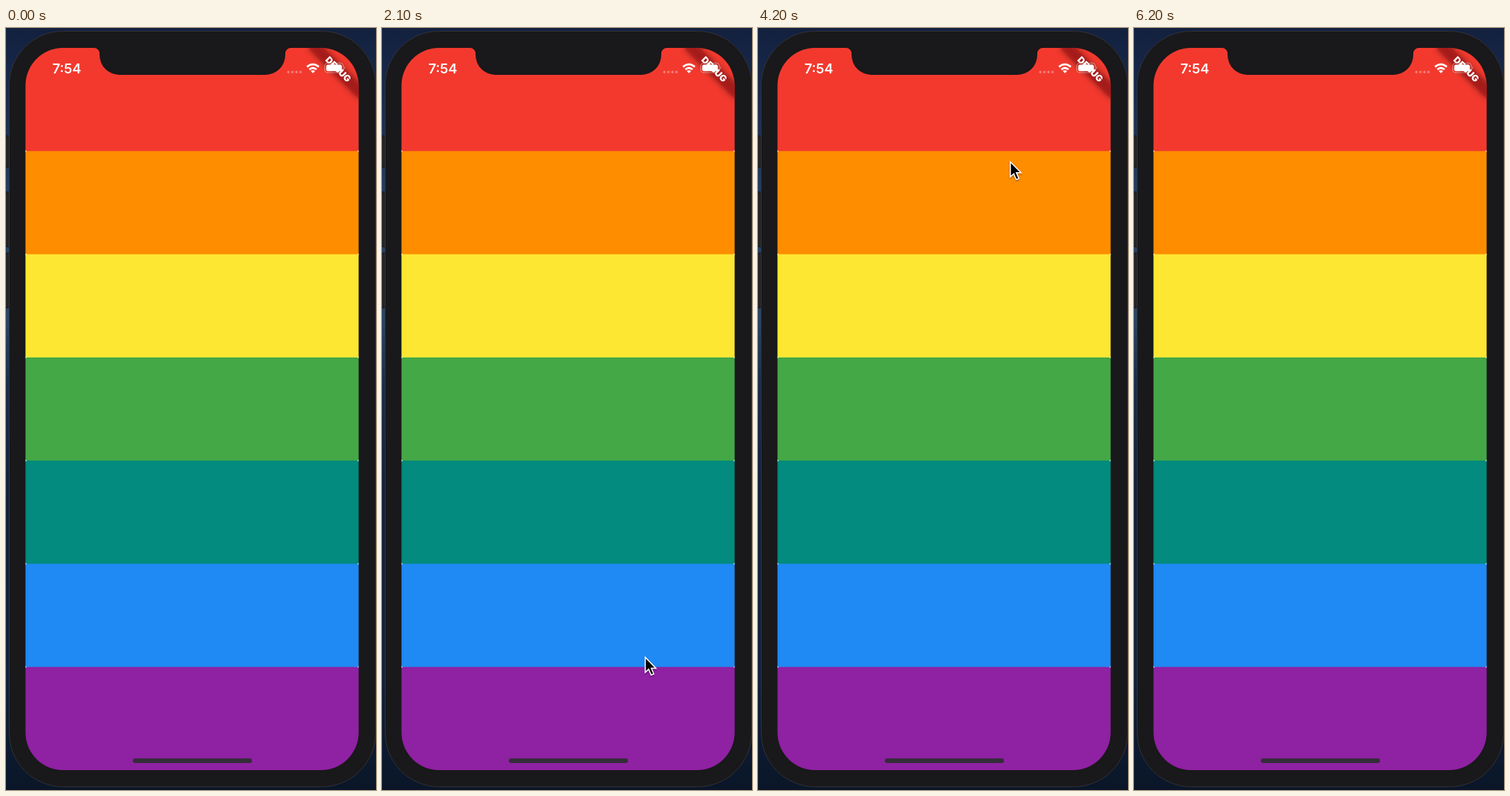
These frames come from a looping animation (522x1073 px, 6.8 s). An HTML page:

```html
<!DOCTYPE html>
<html lang="en">
<head>
<meta charset="utf-8">
<title>Color bands</title>
<style>
  html, body { margin: 0; width: 100%; height: 100%; overflow: hidden; background: #0d1830; }
  svg { display: block; width: 100vw; height: 100vh; }
  text { font-family: Inter, "Open Sans", sans-serif; fill: #fff; }
</style>
</head>
<body>
<svg viewBox="0 0 522 1073" preserveAspectRatio="none">
  <defs>
    <linearGradient id="wall" x1="0" y1="0" x2="0" y2="1">
      <stop offset="0" stop-color="#13213f"/>
      <stop offset=".1" stop-color="#192b4d"/>
      <stop offset=".22" stop-color="#243d62"/>
      <stop offset=".38" stop-color="#2a4463"/>
      <stop offset=".47" stop-color="#192c4b"/>
      <stop offset=".62" stop-color="#121f3a"/>
      <stop offset=".85" stop-color="#11203c"/>
      <stop offset="1" stop-color="#0a1628"/>
    </linearGradient>
    <clipPath id="screen"><rect x="27.5" y="28" width="470" height="1017" rx="53"/></clipPath>
    <filter id="blur" x="-50%" y="-150%" width="200%" height="400%"><feGaussianBlur stdDeviation="4"/></filter>
    <filter id="drop" x="-50%" y="-50%" width="200%" height="200%">
      <feDropShadow dx="0" dy="1.5" stdDeviation="1.3" flood-opacity=".4"/>
    </filter>
  </defs>

  <rect width="522" height="1073" fill="url(#wall)"/>
  <g fill="#242326" stroke="#111" stroke-width="1">
    <rect x="-4" y="152" width="12" height="44"/>
    <rect x="-4" y="231" width="12" height="77"/>
    <rect x="-4" y="317" width="12" height="77"/>
    <rect x="516" y="231" width="12" height="127"/>
  </g>
  <rect x="4.5" y="4.5" width="517" height="1064" rx="76" fill="#19181a" stroke="#333336"/>

  <g clip-path="url(#screen)">
    <g id="bands"></g>
    <g transform="translate(497.5 28) rotate(45)">
      <rect x="-50.1" y="35.1" width="100.3" height="15" fill="#000" opacity=".5" filter="url(#blur)"/>
      <rect x="-50.1" y="35.1" width="100.3" height="15" fill="#b71c1c" opacity=".63"/>
      <text x="1" y="46.2" font-size="12.8" font-weight="900" text-anchor="middle">DEBUG</text>
    </g>
    <path d="M124 27V28A8 8 0 0 1 132 36V38A28 28 0 0 0 160 66H366A28 28 0 0 0 394 38V36A8 8 0 0 1 402 28V27Z" fill="#19181a"/>
    <rect x="179" y="1028.5" width="168" height="6.5" rx="3.2" fill="#332d37"/>
  </g>

  <text x="65.5" y="64" font-size="19" font-weight="600">7:54</text>
  <g fill="#fff" opacity=".36">
    <circle cx="398.4" cy="62" r="1.8"/><circle cx="404.1" cy="62" r="1.8"/>
    <circle cx="409.8" cy="62" r="1.8"/><circle cx="415.5" cy="62" r="1.8"/>
  </g>
  <g fill="none" stroke="#fff" stroke-width="2.8">
    <path d="M424.7 54.8Q433 47.4 441.3 54.8"/>
    <path d="M428 58.4Q433 54 438 58.4"/>
  </g>
  <path d="M430 60.8Q433 58.4 436 60.8L433 63.8Z" fill="#fff"/>
  <rect x="449.8" y="49.4" width="26" height="13.4" rx="4" fill="none" stroke="#fff" stroke-opacity=".4" stroke-width="1.2"/>
  <rect x="451.8" y="51.4" width="22" height="9.4" rx="2.5" fill="#fff"/>
  <path d="M477.2 53.8Q479.6 56.1 477.2 58.4Z" fill="#fff" opacity=".45"/>

  <g id="cursor" filter="url(#drop)">
    <path d="M0 .5V21.6L4.8 17.2 8.3 25.4 12 23.9 8.5 15.8H15Z" fill="#000" stroke="#fff" stroke-width="1.5"/>
  </g>
</svg>

<script>
const LOOP = 6800, STEP = 100;
const TOP = 28, LEFT = 27.5, WIDTH = 470, BAND = 145.29;
const POINT = 1.2533; // stage pixels per device point
const COLORS = ["#f3392e", "#fe8d00", "#fde732", "#44a846", "#028b7e", "#1f8af3", "#8f21a3"];

const TAPS = [
  { band: 6, x: 370, y: 935, down: 1700, up: 1900 },
  { band: 4, x: 379, y: 617, down: 2600, up: 2850 },
  { band: 2, x: 337, y: 435, down: 3650, up: 3850 },
  { band: 0, x: 365, y: 134, down: 4715, up: 4915 }
];

// Pointer path: time, x, y
const PATH = [
  [700, 524, 640], [1400, 362, 703], [1700, 370, 935], [1950, 370, 935],
  [2550, 379, 619], [2900, 379, 619], [3500, 337, 432], [3850, 337, 432],
  [4200, 356, 188], [4600, 365, 134], [4800, 365, 134], [5000, 353, 275],
  [5700, 350, 470], [6200, 350, 470]
];

const clamp = v => Math.max(0, Math.min(1, v));
const bandTop = i => TOP + i * BAND;

function add(parent, tag, attrs) {
  const el = document.createElementNS("http://www.w3.org/2000/svg", tag);
  for (const key in attrs) el.setAttribute(key, attrs[key]);
  return parent.appendChild(el);
}

const defs = document.querySelector("defs");
const bandLayer = document.getElementById("bands");
const cursor = document.getElementById("cursor");

// Each fill runs slightly under the next one so no seam shows.
COLORS.forEach((fill, i) =>
  add(bandLayer, "rect", { x: LEFT - 1, y: bandTop(i), width: WIDTH + 2, height: BAND + 1, fill }));

// Rounded band corners leave small light notches at the screen edges.
for (let i = 1; i < COLORS.length; i++) {
  for (const [x, side] of [[LEFT, 1], [LEFT + WIDTH, -1]]) {
    const y = bandTop(i);
    add(bandLayer, "path", { d: `M${x} ${y - 1.6}L${x + side * 1.6} ${y}L${x} ${y + 1.6}Z`, fill: "#fff" });
  }
}

for (const tap of TAPS) {
  const y = bandTop(tap.band);
  const box = { x: LEFT, y, width: WIDTH, height: BAND };
  const clip = add(defs, "clipPath", { id: "band" + tap.band });
  add(clip, "rect", box);
  const group = add(bandLayer, "g", { "clip-path": `url(#band${tap.band})` });
  tap.shade = add(group, "rect", box);
  tap.splash = add(group, "circle", { cx: tap.x, cy: tap.y });
  const dx = Math.max(tap.x - LEFT, LEFT + WIDTH - tap.x);
  const dy = Math.max(tap.y - y, y + BAND - tap.y);
  tap.reach = Math.hypot(dx, dy);
}

function drawTap(tap, t) {
  const held = clamp((Math.min(t, tap.up) - tap.down) / 1000);
  const freed = Math.max(0, t - tap.up);
  const grown = clamp(held + freed * POINT / tap.reach);
  const on = t >= tap.down ? 1 : 0;
  tap.splash.setAttribute("r", grown * tap.reach);
  tap.splash.setAttribute("opacity", on * 0.12 * clamp(1 - freed / 200));
  tap.shade.setAttribute("opacity", 0.055 * clamp((t - tap.down) / 65) * clamp(1 - freed / 80));
}

function drawCursor(t) {
  const i = PATH.findIndex(p => p[0] > t);
  cursor.style.display = i > 0 ? "" : "none";
  if (i < 1) return;
  const [t0, x0, y0] = PATH[i - 1], [t1, x1, y1] = PATH[i];
  const k = (t - t0) / (t1 - t0), e = k * k * (3 - 2 * k);
  cursor.setAttribute("transform", `translate(${x0 + (x1 - x0) * e} ${y0 + (y1 - y0) * e})`);
}

function draw(time) {
  const t = Math.floor(time % LOOP / STEP) * STEP;
  for (const tap of TAPS) drawTap(tap, t);
  drawCursor(t);
}

const start = performance.now();
function tick() {
  draw(performance.now() - start);
  requestAnimationFrame(tick);
}
tick();
</script>
</body>
</html>
```
